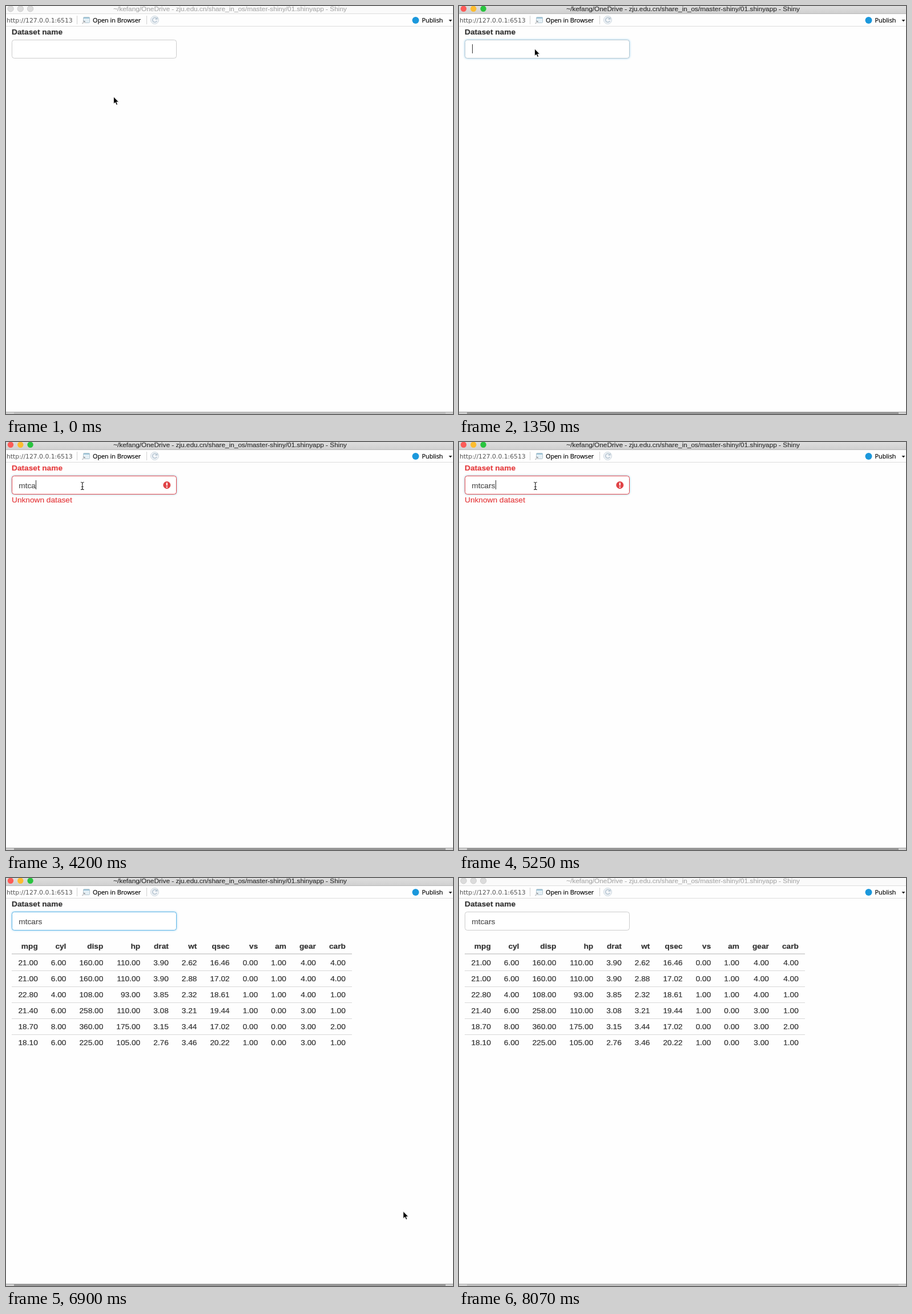
Write an HTML page that moves like this. It is 783 by 715 pixels and loops after 8170 ms.

```html
<!DOCTYPE html>
<html lang="en">
<head>
<meta charset="utf-8">
<title>Dataset name</title>
<style>
html, body { margin: 0; width: 100%; height: 100%; overflow: hidden; background: #fefefe; }
svg { display: block; }
text, table { font: 13.7px "Liberation Sans", Arial, sans-serif; color: #333; white-space: pre; }
text { fill: currentColor; stroke: currentColor; stroke-width: .2; }
table { border-spacing: 0; text-align: right; -webkit-text-stroke: .2px; }
tr { height: 28px; }
th, td { box-sizing: border-box; height: 28px; padding: 0 11.5px; }
th { border-bottom: 2px solid #d8d8d8; }
tr + tr + tr td { border-top: 1px solid #d8d8d8; }
.bar { font: 10.8px "Open Sans", "Noto Sans", sans-serif; color: #000; }
#title { font-size: 11.82px; text-anchor: middle; }
#url { font: 10.8px "DejaVu Sans", sans-serif; color: #555; stroke: none; }
#label { font-weight: bold; }
#typed { color: #505050; }
#message { color: #e53e40; }
</style>
</head>
<body>
<svg width="783" height="715" viewBox="0 0 783 715">
  <defs>
    <linearGradient id="chrome" x2="0" y2="1">
      <stop stop-color="#dedede"/><stop offset="1" stop-color="#d0d0d0"/>
    </linearGradient>
    <filter id="blur" x="-10%" y="-40%" width="120%" height="180%"><feGaussianBlur stdDeviation="1.4"/></filter>
  </defs>

  <rect width="783" height="715" fill="#fefefe"/>
  <rect id="titlebar" width="783" height="13"/>
  <rect id="edge" y="13" width="783" height="1"/>
  <g id="lights"></g>
  <text id="title" x="392.5" y="9">~/kefang/OneDrive - zju.edu.cn/share_in_os/master-shiny/01.shinyapp - Shiny</text>

  <rect y="35" width="783" height="1" fill="#dcdcdc"/>
  <path d="M124.5 17V32M246.5 17V32" stroke="#d2d2d2"/>
  <text id="url" x="1" y="28.6">http://127.0.0.1:6513</text>
  <g fill="#e4eff5" stroke="#b4c6d0">
    <rect x="135.5" y="19.5" width="11" height="10" rx="1"/>
    <path d="M136 21H146" stroke="#9cc4d8" stroke-width="2"/>
    <path d="M133 31.5V26H139V31.5Z" fill="#f6f6f6" stroke="none"/>
    <path d="M133.5 31L138 26.5M135 26.5H138V29.5" fill="none" stroke="#8b939a"/>
  </g>
  <text class="bar" x="152" y="28.6">Open in Browser</text>
  <g fill="none" stroke="#b9c7d3">
    <circle cx="260.5" cy="24.5" r="7" fill="#f3f6f9" stroke="#c9d4dd"/>
    <path d="M263.8 22A4 4 0 1 0 264.3 26" stroke-width="1.7"/>
    <path d="M265.6 19V23.8H260.8Z" fill="#b9c7d3" stroke="none"/>
  </g>
  <circle cx="717.5" cy="25" r="6" fill="#1b98dc"/>
  <text class="bar" x="728.5" y="28.6">Publish</text>
  <path d="M775.5 24H781.5L778.5 27.5Z" fill="#222"/>

  <text id="label" x="10" y="50">Dataset name</text>
  <rect id="glow" x="10.5" y="59.5" width="288" height="32" rx="4" fill="none" stroke="#a5d8f3" stroke-width="2" filter="url(#blur)"/>
  <rect id="field" x="10.5" y="59.5" width="288" height="32" rx="4" fill="#fff"/>
  <text id="typed" x="22.3" y="80.5"></text>
  <rect id="caret" y="67" width="1" height="16" fill="#333"/>
  <g id="error">
    <circle cx="281.8" cy="75.5" r="6.5" fill="#e04346"/>
    <path d="M281.8 71.3V76.5M281.8 78V80" stroke="#fff" stroke-width="2.2"/>
    <text id="message" x="10" y="106">Unknown dataset</text>
  </g>
  <foreignObject id="data" x="10" y="106" width="640" height="200"><table id="table"></table></foreignObject>

  <rect y="711" width="783" height="4" fill="#cfcfcf"/>
  <rect id="shade" x="14" y="712" width="756" height="3"/>
  <rect id="base" y="711" width="783" height="1"/>

  <path id="beam" d="M131 70.5Q133.8 70.5 133.8 72.5V81.5Q133.8 83.5 131 83.5M136.6 70.5Q133.8 70.5 133.8 72.5M133.8 81.5Q133.8 83.5 136.6 83.5M132 78.5H135.6" fill="none" stroke="#222" stroke-width="1.1"/>
  <path id="arrow" d="M0 0V12.6L2.9 9.9L4.9 14.4L7 13.5L5.1 9.2H9Z" stroke="#fff" stroke-width=".8"/>
</svg>
<script>
const LOOP = 8170, STEP = 150, BLINK = 510;
const FOCUS = 1350, INVALID = 2700, VALID = 5550, LEAVE = 6150, GONE = 7490, BLUR = 8070;
const WORD = 'mtcars', KEYS = [2400, 2700, 3600, 4200, 4650, 5250];
const RED = '#e04448', BLUE = '#5eb5e6', GREY = '#ccc';

const $ = id => document.getElementById(id);
const set = (id, attrs) => { for (const k in attrs) $(id).setAttribute(k, attrs[k]); };
const show = (id, on) => set(id, { visibility: on ? 'visible' : 'hidden' });
const mix = (a, b, p) => a + (b - a) * p;
const smooth = p => p * p * (3 - 2 * p);
const easeOut = (p, power) => 1 - (1 - p) ** power;

function buildTable() {
  const rows = `mpg cyl disp hp drat wt qsec vs am gear carb
21 6 160 110 3.9 2.62 16.46 0 1 4 4
21 6 160 110 3.9 2.88 17.02 0 1 4 4
22.8 4 108 93 3.85 2.32 18.61 1 1 4 1
21.4 6 258 110 3.08 3.21 19.44 1 0 3 1
18.7 8 360 175 3.15 3.44 17.02 0 0 3 2
18.1 6 225 105 2.76 3.46 20.22 1 0 3 1`.split('\n');
  $('table').innerHTML = rows.map((row, r) => '<tr>' + row.split(' ').map(cell =>
    r ? `<td>${(+cell).toFixed(2)}</td>` : `<th>${cell}</th>`).join('')).join('');
}

function pointer(t) {
  const held = Math.floor((t + 10) / STEP) * STEP;
  if (t < KEYS[0]) {
    const p = smooth(Math.min(1, held / 1050));
    return [mix(188.5, 132.5, p), mix(159, 75, p)];
  }
  const p = Math.min(1, (held - LEAVE) / 1200);
  return p > 0 && t < GONE ? [mix(133, 750, easeOut(p, 2.48)), mix(76, 701, easeOut(p, 1.71))] : null;
}

function borderColour(t) {
  if (t < FOCUS || t >= BLUR) return GREY;
  const [start, from, to] = t < INVALID ? [FOCUS, GREY, BLUE] : t < VALID ? [INVALID, BLUE, RED] : [VALID, RED, BLUE];
  return t < start + STEP ? `color-mix(in srgb, ${to} 20%, ${from})` : to;
}

function drawWindow(active) {
  set('titlebar', { fill: active ? 'url(#chrome)' : '#fafafa' });
  set('edge', { fill: active ? '#b8b8b8' : '#dedede' });
  const lamps = active ? ['#fc5b57', '#fdbc2e', '#29c43f'] : Array(3).fill('#dcdcdc');
  $('lights').innerHTML = lamps.map((fill, i) =>
    `<circle cx="${8 + 17.3 * i}" cy="4.8" r="5.2" fill="${fill}" stroke="${active ? 'none' : '#cdcdcd'}"/>`).join('');
  $('title').style.color = active ? '#333' : '#acacac';
  set('shade', { fill: active ? '#969696' : '#bdbdbd' });
  set('base', { fill: active ? '#a2a2a2' : '#b2b2b2' });
}

function drawField(t, active) {
  const bad = t >= INVALID && t < VALID;
  $('label').style.color = bad ? '#e53e40' : '#333';
  $('field').style.stroke = borderColour(t);
  show('glow', active);
  show('error', bad);

  const count = KEYS.filter(key => t >= key).length;
  $('typed').textContent = WORD.slice(0, count);
  const width = count ? $('typed').getComputedTextLength() : 0;
  set('caret', { x: Math.round(22.8 + width) });
  const lastKey = count ? KEYS[count - 1] : FOCUS;
  show('caret', active && Math.floor((t - lastKey) / BLINK) % 2 === 0);
}

function draw(t) {
  const active = t >= FOCUS && t < BLUR;
  drawWindow(active);
  drawField(t, active);
  show('data', t >= VALID);

  const tip = pointer(t);
  show('arrow', tip);
  if (tip) set('arrow', { transform: `translate(${tip})` });
  show('beam', !tip && t < GONE);
}

buildTable();
const start = performance.now();
function tick() {
  draw((performance.now() - start) % LOOP);
  requestAnimationFrame(tick);
}
tick();
</script>
</body>
</html>
```
